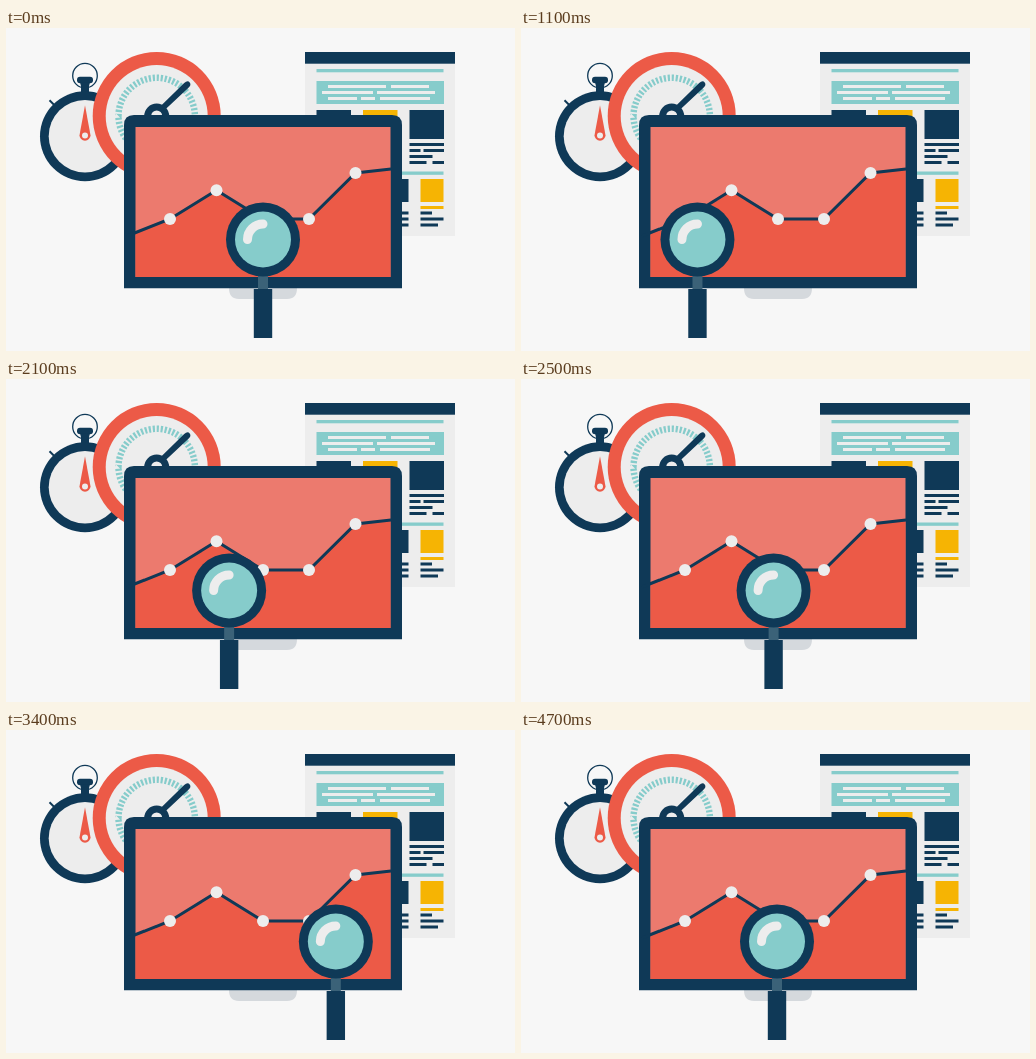
An HTML page for the animation above (4.8 s loop, 509 by 323 pixels).

```html
<!DOCTYPE html>
<html lang="en">
<head>
<meta charset="utf-8">
<title>Analytics</title>
<style>
html, body { margin: 0; width: 100%; height: 100%; overflow: hidden; background: #f7f7f7; }
svg { display: block; }
.navy { fill: #0f3957; }
.red { fill: #ec5a47; }
.teal { fill: #86cccb; }
.pale { fill: #ededed; }
.gold { fill: #f6b403; }
.line { fill: none; stroke: #0f3957; }
</style>
</head>
<body>
<svg width="509" height="323" viewBox="0 0 509 323">
  <g id="page"></g>

  <!-- stopwatch -->
  <g transform="translate(79 108.200)">
    <circle class="line" cy="-60.500" r="12.300" stroke-width="1.300"/>
    <rect class="navy" x="-8" y="-59.500" width="16" height="6.500" rx="3"/>
    <path class="navy" d="M-5 -54H5L4 -50V-43H-4V-50z"/>
    <path class="line" stroke-width="2" d="M-35.500 -36L-31 -31.500"/>
    <circle class="navy" r="45"/>
    <circle class="pale" r="36.300"/>
    <path class="red" d="M0 -31L5.500 -1A5.500 5.500 0 1 1 -5.500 -1z"/>
    <circle class="pale" cy="-.7" r="3"/>
  </g>

  <!-- gauge -->
  <g transform="translate(150.700 88)">
    <circle class="red" r="64"/>
    <circle class="pale" r="51"/>
    <circle r="38.200" fill="none" stroke="#86cccb" stroke-width="6.500" pathLength="120" stroke-dasharray="1.100 .9"/>
    <path class="navy" d="M4 -10L27.500 -33Q31 -36 33 -33.500T31.500 -28L8 -6z"/>
    <circle class="line" r="9" stroke-width="7"/>
  </g>

  <!-- monitor -->
  <path fill="#d5d9dd" d="M223 260H291Q291 271 281 271H233Q223 271 223 260z"/>
  <path class="navy" d="M118 260.300V97Q118 87 128 87H386Q396 87 396 97V260.300z"/>
  <path fill="#ec7a6e" d="M129.500 99H384.500V249H129.500z"/>
  <g id="chart"></g>

  <!-- magnifier, centred on x = 0 -->
  <g id="glass">
    <path fill="#3b6278" d="M-5 246H5V261H-5z"/>
    <path class="navy" d="M-9.200 261H9.200V310H-9.200z"/>
    <circle class="navy" cy="211.500" r="37"/>
    <circle class="teal" cy="211.500" r="28"/>
    <path fill="none" stroke="#ededed" stroke-width="9" stroke-linecap="round" d="M-15.500 211.500A15.500 15.500 0 0 1 0 196"/>
  </g>
</svg>
<script>
const LOOP = 4800, STEP = 100, COLUMN = 46.5, CARD = 34.5;
const get = id => document.getElementById(id);

const bar = (color, x, y, w, h) =>
  `<rect class="${color}" x="${x}" y="${y}" width="${w}" height="${h}"/>`;

// A row of text shown as bars: lengths alternate between bar and gap
const row = (color, x, y, ...lengths) => lengths.map((w, i) => {
  const part = i % 2 ? "" : bar(color, x, y, w, 3);
  x += w;
  return part;
}).join("");

function drawPage() {
  let out = bar("pale", 299, 24, 150, 184) + bar("navy", 299, 24, 150, 11.7);
  out += bar("teal", 310.5, 41, 127, 3.3) + bar("teal", 310.5, 53, 127.5, 23);
  out += bar("teal", 310.5, 143.5, 127, 3.3);
  out += row("pale", 322, 57, 58, 5, 38);
  out += row("pale", 316, 63, 51, 4, 58);
  out += row("pale", 322, 69, 29, 4, 14, 5, 50);

  for (let i = 0; i < 3; i++)
    out += bar(i === 1 ? "gold" : "navy", 310.5 + i * COLUMN, 82, CARD, 29);
  const right = 310.5 + 2 * COLUMN;
  [[CARD], [11, 3, 20.5], [23], [17, 6, 11.5]].forEach((lengths, i) => {
    out += row("navy", right, 115 + 6 * i, ...lengths);
  });

  const last = 414.5;
  out += bar("navy", last - COLUMN, 151, CARD, 23) + bar("gold", last, 151, 23, 23);
  out += row("gold", last, 178, 23);
  [11.5, 23, 17.5].forEach((w, i) => {
    const y = 183.5 + 6 * i;
    out += row("navy", last - COLUMN, y, CARD) + row("navy", last, y, w);
  });
  get("page").innerHTML = out;
}

function drawChart() {
  const dots = [[164, 191], [210.5, 162.3], [257, 191], [303, 191], [349.5, 145]];
  const line = dots.join("L");
  get("chart").innerHTML =
    `<path class="red" d="M129.500 249V204.500L${line}L384.500 141V249z"/>` +
    `<path class="line" stroke-width="3" d="M121 208L${line}L385 141"/>` +
    dots.map(([x, y]) => `<circle class="pale" cx="${x}" cy="${y}" r="6"/>`).join("");
}

// The lens sweeps left, then right, then back to the middle: [ms, x]
const sweep = [[0, 257], [600, 218], [1250, 164], [2400, 244], [3600, 347], [4700, 256], [LOOP, 257]];

function lensX(t) {
  const i = sweep.findIndex(p => p[0] > t);
  const [t0, x0] = sweep[i - 1], [t1, x1] = sweep[i];
  return x0 + (x1 - x0) * (t - t0) / (t1 - t0);
}

function draw() {
  const t = Math.floor(performance.now() % LOOP / STEP) * STEP;
  get("glass").setAttribute("transform", `translate(${lensX(t)} 0)`);
  requestAnimationFrame(draw);
}

drawPage();
drawChart();
draw();
</script>
</body>
</html>
```
